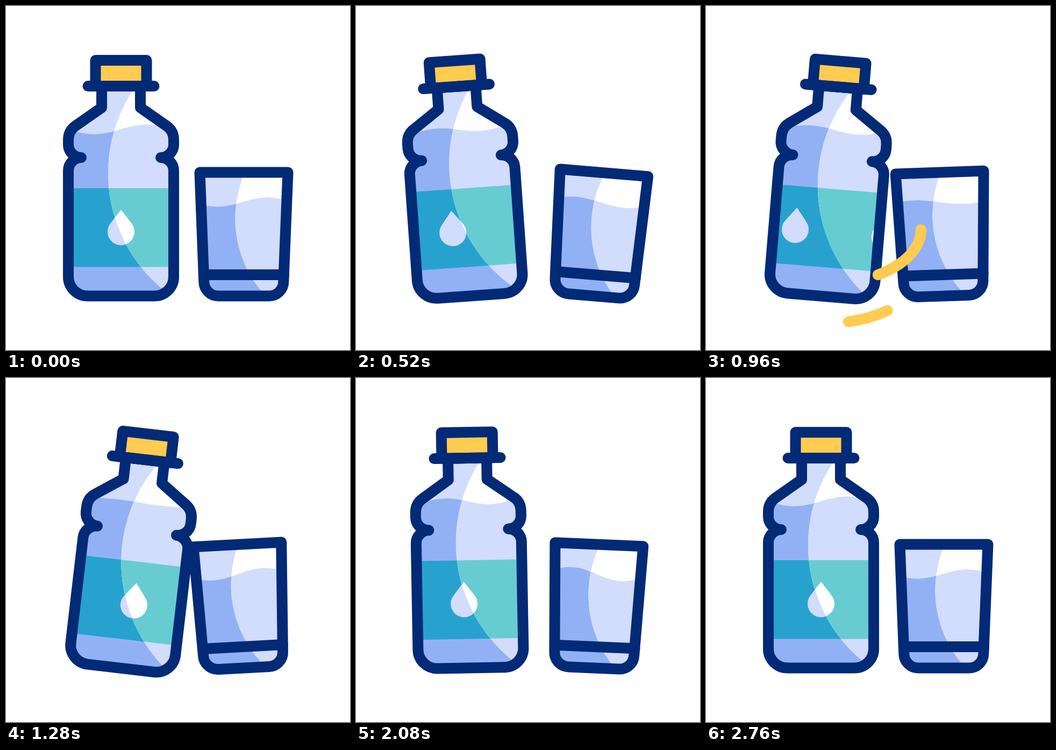
Write an HTML page with a canvas that moves like this. It is 640 px wide and 640 px high and loops after 3 s.

```html
<!DOCTYPE html>
<html lang="en">
<head>
<meta charset="utf-8">
<title>Bottle and glass</title>
<style>
  html, body { margin: 0; width: 100%; height: 100%; overflow: hidden; background: #fff; }
  canvas { display: block; width: 100%; height: 100%; }
</style>
</head>
<body>
<canvas id="stage" width="640" height="640"></canvas>
<script>
const ctx = document.getElementById('stage').getContext('2d');
const LOOP = 3000, STEP = 40, REST = 2760, TAU = Math.PI * 2;
const NAVY = '#032a76', YELLOW = '#ffcb50';
const SHADE = { air: '#d2dcfd', water: '#92b1f4', label: '#27a2ce', drop: '#d2dcfd' };
const LIGHT = { air: '#ffffff', water: '#d2dcfd', label: '#67ccd2', drop: '#ffffff' };
const DROP_GAP = 167.5;
const PIVOT_Y = 537;

const bottleBody = new Path2D('M178 149V189L128 224Q116 233 116 249V258C116 271 127 282 140 282' +
  'C127 282 116 293 116 306V504A36 35.5 0 0 0 152 539.5H276A36 35.5 0 0 0 312 504V306' +
  'C312 293 301 282 288 282C301 282 312 271 312 258V249Q312 233 300 224L250 189V149Z');
const glassBody = new Path2D('M360.5 309.5H524.5L516.3 513A27 26.5 0 0 1 489 539.5H395.5' +
  'A27 26.5 0 0 1 368.3 513Z');
const glassBar = new Path2D('M368 500H517');
const capBox = new Path2D('M166.5 101H261.5V149H166.5Z');
const capRim = new Path2D('M152.5 149H275.5');

function ease(time, from, to) {
  const u = Math.min(1, Math.max(0, (time - from) / (to - from)));
  return u * u * (3 - 2 * u);
}

// Starts at a value and eases by each amount in turn: [amount, from ms, to ms].
function sway(time, value, ...moves) {
  return moves.reduce((sum, [amount, from, to]) => sum + amount * ease(time, from, to), value);
}

function poseAt(time) {
  return {
    bottleTilt: sway(time, 0, [-4.05, 0, 520], [10.7, 520, 1120], [-8.9, 1540, 1960],
      [3.85, 1960, 2280], [-1.6, 2280, REST]),
    glassTilt: sway(time, 0, [4.8, 0, 540], [-8.5, 540, 1130], [6.5, 1130, 1900], [-2.8, 1900, REST]),
    labelSpin: sway(time, 0, [-25.5, 0, 520], [203.5, 520, 1240], [-21.2, 1600, 2080],
      [DROP_GAP - 156.8, 2080, REST]),
    bottleWave: sway(time, 9, [-14, 0, 520], [7.5, 960, 1600], [-8.5, 1720, 2080], [15, 2080, REST]),
    glassWave: sway(time, 8.5, [-15, 0, 520], [15.5, 880, 1280], [-20, 1400, 2080], [19.5, 2080, REST]),
    swooshHead: ease(time, 620, 920),
    swooshTail: ease(time, 720, 1105)
  };
}

function tilted(x, degrees, draw) {
  ctx.save();
  ctx.translate(x, PIVOT_Y);
  ctx.rotate(degrees * Math.PI / 180);
  ctx.translate(-x, -PIVOT_Y);
  draw();
  ctx.restore();
}

function outline(path) {
  ctx.strokeStyle = NAVY;
  ctx.stroke(path);
}

function fillWater(wave) {
  ctx.beginPath();
  ctx.moveTo(90, 560);
  for (let x = 90; x <= 540; x += 3) {
    ctx.lineTo(x, wave.y - wave.amp * Math.sin(TAU * (x - wave.x) / wave.length));
  }
  ctx.lineTo(540, 560);
  ctx.fill();
}

function fillDrop(x) {
  const y = 420, r = 25, tip = 41;
  const side = Math.acos(r / tip);
  ctx.beginPath();
  ctx.moveTo(x, y - tip);
  ctx.arc(x, y, r, side - Math.PI / 2, Math.PI * 1.5 - side);
  ctx.fill();
}

// Contents are painted in shade, then again in light inside the highlight circle.
function fillVessel(body, wave, shine, decorate) {
  const paint = colors => {
    ctx.fillStyle = colors.air;
    ctx.fillRect(90, 90, 460, 470);
    ctx.fillStyle = colors.water;
    fillWater(wave);
    if (decorate) decorate(colors);
  };
  ctx.save();
  ctx.clip(body);
  paint(SHADE);
  ctx.beginPath();
  ctx.arc(shine.x, shine.y, shine.r, 0, TAU);
  ctx.clip();
  paint(LIGHT);
  ctx.restore();
}

function drawBottle(pose) {
  const amp = pose.bottleWave;
  const wave = { x: 213, y: 229.5, amp, length: 160 + 4 * Math.max(0, amp) };
  const dropX = 214 + pose.labelSpin;
  fillVessel(bottleBody, wave, { x: 470, y: 311, r: 280 }, colors => {
    ctx.fillStyle = colors.label;
    ctx.fillRect(110, 339, 208, 146.5);
    ctx.fillStyle = colors.drop;
    fillDrop(dropX);
    fillDrop(dropX - DROP_GAP);
  });
  outline(bottleBody);
  ctx.fillStyle = YELLOW;
  ctx.fill(capBox);
  outline(capBox);
  outline(capRim);
}

function drawGlass(pose) {
  const wave = { x: 440, y: 364.8, amp: pose.glassWave, length: 186 };
  fillVessel(glassBody, wave, { x: 639.5, y: 395, r: 213 });
  outline(glassBody);
  outline(glassBar);
}

function drawSwoosh(y, from, to, head, tail) {
  const angle = part => (from + (to - from) * part) * Math.PI / 180;
  ctx.beginPath();
  ctx.ellipse(226, y, 174, 100, 0, angle(tail), angle(head), true);
  ctx.strokeStyle = YELLOW;
  ctx.stroke();
}

function draw(time) {
  const pose = poseAt(time);
  const { swooshHead: head, swooshTail: tail } = pose;
  ctx.fillStyle = '#fff';
  ctx.fillRect(0, 0, 640, 640);
  ctx.lineWidth = 20;
  ctx.lineCap = ctx.lineJoin = 'round';
  tilted(442.5, pose.glassTilt, () => drawGlass(pose));
  tilted(211, pose.bottleTilt, () => drawBottle(pose));
  if (head > tail) {
    drawSwoosh(416, 180, 0, head, tail);
    drawSwoosh(490, 135, 50, head, tail);
  }
}

const start = performance.now();
function tick() {
  const time = (performance.now() - start) % LOOP;
  draw(Math.floor(time / STEP) * STEP);
  requestAnimationFrame(tick);
}
tick();
</script>
</body>
</html>
```
